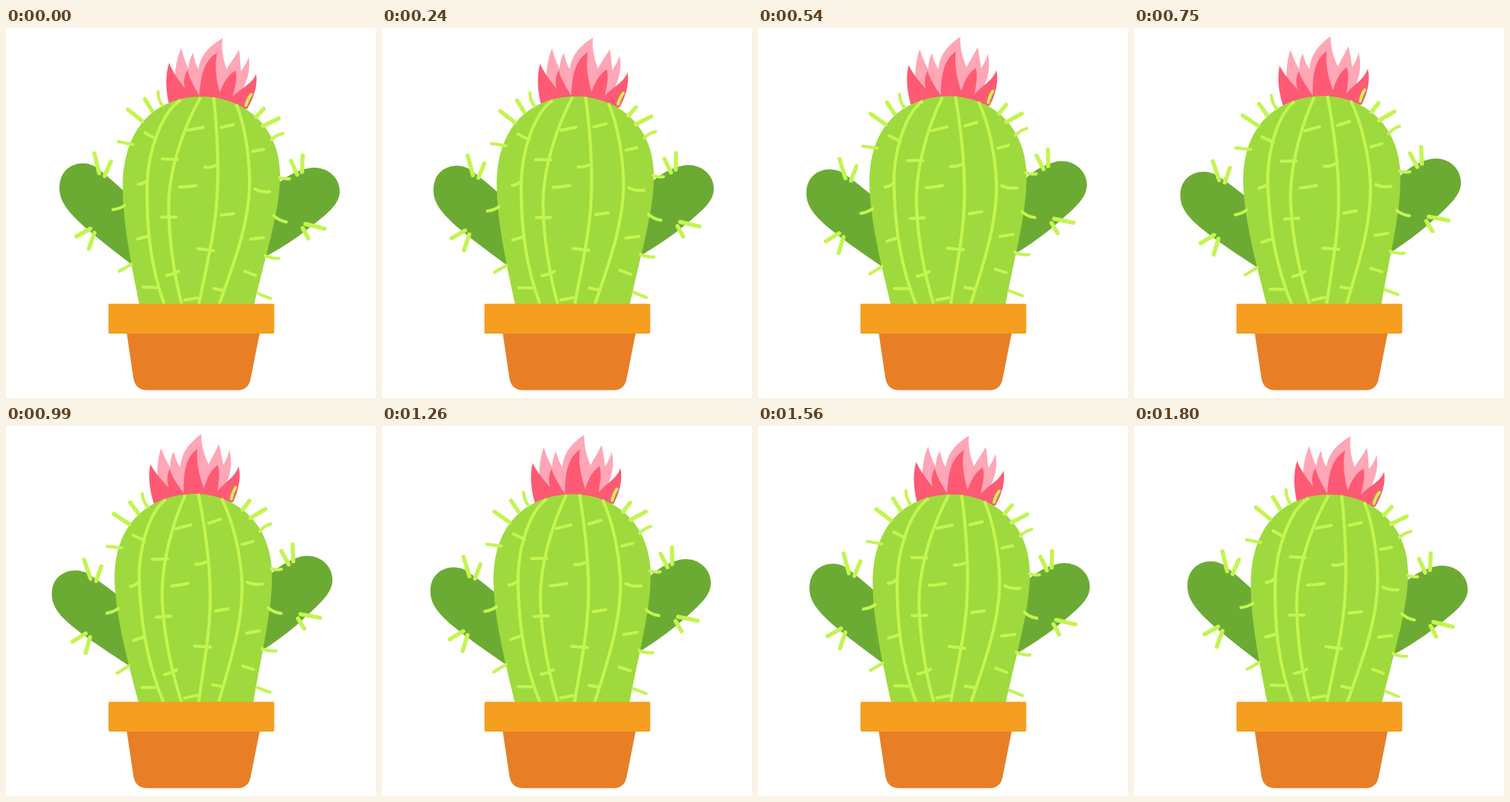
An HTML page with a canvas for the animation above (1.83 s loop, 540 by 540 pixels).

```html
<!DOCTYPE html>
<html lang="en">
<head>
<meta charset="utf-8">
<title>Swaying cactus</title>
<style>
html, body { margin: 0; width: 100%; height: 100%; overflow: hidden; background: #fff; }
canvas { display: block; width: 100vw; height: 100vh; }
</style>
</head>
<body>
<canvas id="stage" width="540" height="540"></canvas>
<script>
const ctx = document.getElementById('stage').getContext('2d');
const LOOP = 1830, STEP = 30, HALF = 900;
const BASE_X = 262, BASE_Y = 408;

const LEAF = '#9eda3d', ARM = '#6cab33', SPINE = '#c3f550';
const PINK = '#ffa6b7', ROSE = '#ff5a73';

const arms = [
  'M190 254 L172 238 C157 224 143 212 134 205 C115 190 78 197 78 234 C78 262 105 285 182 344 L200 350 Z',
  'M380 245 L390 233 C408 216 425 208 440 205 C462 199 487 214 487 238 C487 258 470 270 436 297 C420 309 400 322 382 332 L360 340 Z'
];

const backPetals =
  'M248 95 C244 70 248 46 256 29 C258 40 262 50 266 59 C267 50 269 43 273 36 C275 46 277 54 281 60 ' +
  'C284 38 299 25 316 15 C314 30 317 46 322 60 C328 50 335 41 340 32 C342 44 342 53 343 63 ' +
  'C348 56 352 50 354 42 C357 60 353 75 346 88 L335 104 L260 104 Z';

const frontPetals =
  'M239 116 C233 92 232 70 238 51 C243 64 252 76 261 88 C259 78 260 70 265 61 C268 76 276 87 282 99 ' +
  'C284 72 288 48 308 36 C304 56 307 76 312 94 C318 78 325 68 335 62 C338 74 334 86 331 100 ' +
  'C344 87 359 82 365 67 C368 84 361 103 352 118 Z';

const body =
  'M195.5 408 C184 350 170 285 170.5 230 C171 150 214 100 287 100 ' +
  'C355 102 400 150 400 214 C400 267 380 326 361 408 Z';

const ribs = [
  'M255 105 C228 122 207 178 206 230 C205 290 210 345 231.5 405',
  'M284 101 C264 136 239 198 237.5 255 C237 305 245 360 257 405',
  'M303 101 C308 145 311 205 308 245 C306 295 292 350 281 405',
  'M336 111 C350 145 356 195 355.5 230 C354 290 330 350 310.5 405'
];

const ticks = [
  'M203 153 L219 162', 'M266 149 L288 145', 'M314 145 L332 141',
  'M228 191 L250 192', 'M290 203 Q299 204 305 201', 'M360 180 L376 177',
  'M193 228 Q202 227 206 222', 'M253 232 Q266 232 277 230', 'M363 235 Q373 240 385 239',
  'M227 276 L248 276', 'M314 273 L332 271', 'M192 308 L207 304',
  'M280 322 L303 325', 'M357 308 L376 306', 'M234 361 Q243 360 252 355',
  'M348 355 L364 361', 'M200 378 L220 379', 'M303 380 L317 383', 'M261 397 L279 394'
];

const rimSpines = [
  'M164 166 L185 170', 'M156 265 Q166 264 173 259', 'M165 355 L183 345',
  'M222 93 Q222 105 228 113', 'M358 97 Q353 103 350 113', 'M404 154 Q394 156 387 163',
  'M399 218 Q407 221 414 220', 'M391 274 Q398 281 409 283', 'M378 332 Q388 337 398 336',
  'M367 387 L386 395'
];

const thickSpines = [
  'M178 119 L199 136', 'M203 104 L213 121', 'M376 118 L365 130', 'M398 132 L375 143',
  'M129 183 L136 212', 'M153 195 L144 216', 'M103 304 L123 293', 'M129 299 L121 322',
  'M416 194 L425 214', 'M433 186 L432 210', 'M437 286 L465 293', 'M433 292 L441 307'
];

// Lean the plant to the left, more strongly the higher a point lies.
function bend(x, y, s) {
  const h = BASE_Y - y;
  const mid = BASE_X + 0.06 * h;
  return [
    x - s * (0.0545 * h + 0.00008 * h * h),
    y - s * (0.0545 + 0.00016 * h) * (x - mid)
  ];
}

function trace(d, s) {
  const draw = { M: 'moveTo', L: 'lineTo', Q: 'quadraticCurveTo', C: 'bezierCurveTo', Z: 'closePath' };
  ctx.beginPath();
  for (const [, cmd, args] of d.matchAll(/([MLQCZ])([^MLQCZ]*)/g)) {
    const n = args.trim().split(/\s+/).map(Number);
    const pts = [];
    for (let i = 0; i + 1 < n.length; i += 2) pts.push(...bend(n[i], n[i + 1], s));
    ctx[draw[cmd]](...pts);
  }
}

function fill(d, color, s) {
  trace(d, s);
  ctx.fillStyle = color;
  ctx.fill();
}

function stroke(list, width, s, cap = 'round') {
  ctx.strokeStyle = SPINE;
  ctx.lineWidth = width;
  ctx.lineCap = cap;
  for (const d of list) {
    trace(d, s);
    ctx.stroke();
  }
}

function pot() {
  fill('M176 444 L186 511 Q189 528.5 206 528.5 L338 528.5 Q354 528.5 357 512 L370.5 444 Z', '#e87f27', 0);
  ctx.fillStyle = '#f59e1f';
  ctx.beginPath();
  ctx.roundRect(149.5, 402.5, 242, 43.5, 2);
  ctx.fill();
}

// Mostly steady sway, slightly softened at both ends.
function sway(t) {
  const u = 1 - Math.abs(t - HALF) / HALF;
  const soft = (1 - Math.cos(Math.PI * u)) / 2;
  return 0.75 * u + 0.25 * soft;
}

function render(time) {
  const s = sway(Math.floor((time % LOOP) / STEP) * STEP);
  ctx.fillStyle = '#fff';
  ctx.fillRect(0, 0, 540, 540);
  for (const d of arms) fill(d, ARM, s);
  fill(backPetals, PINK, s);
  fill(frontPetals, ROSE, s);
  fill(body, LEAF, s);
  stroke(ribs, 4.5, s, 'butt');
  stroke(ticks, 4.5, s);
  stroke(rimSpines, 4.5, s);
  stroke(thickSpines, 6, s);
  pot();
}

const start = performance.now();
function loop() {
  render(performance.now() - start);
  requestAnimationFrame(loop);
}
loop();
</script>
</body>
</html>
```
